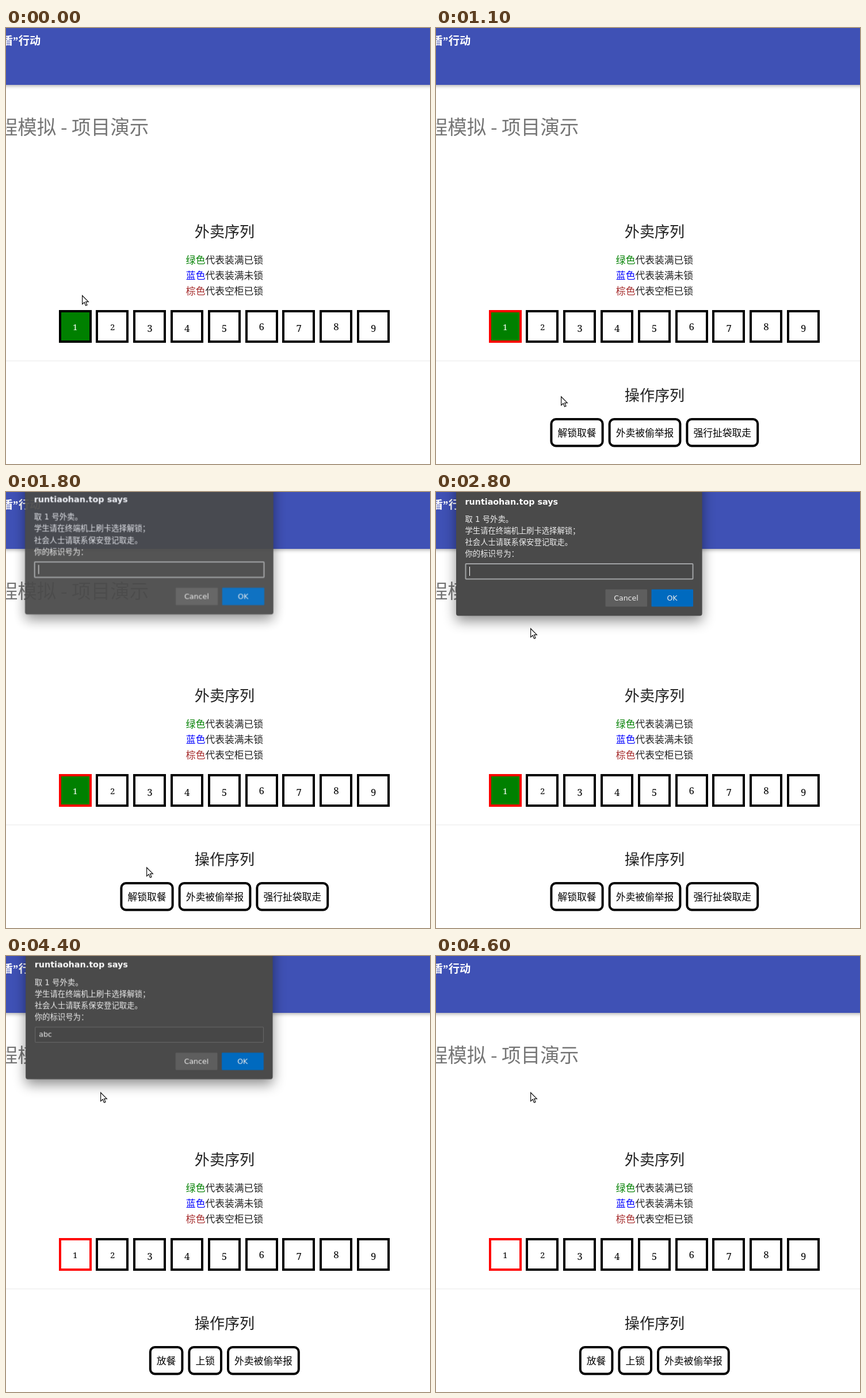
These frames come from a looping animation (737x759 px, 5.6 s). An HTML page:

```html
<!DOCTYPE html>
<html lang="zh-CN">
<head>
<meta charset="utf-8">
<title>外卖柜流程演示</title>
<style>
  html, body { margin: 0; width: 100%; height: 100%; overflow: hidden; background: #fff; }
  svg { display: block; width: 737px; height: 759px; }
  text { font-family: "Noto Sans CJK SC", "Noto Sans CJK", sans-serif; font-size: 16.8px; fill: #212121; white-space: pre; }
  .mid { text-anchor: middle; }
  .end { text-anchor: end; }
  .bar { fill: #3f51b5; filter: drop-shadow(0 2px 3px rgba(0, 0, 0, .32)); }
  .brand { font-size: 19.2px; font-weight: 700; fill: #fff; }
  .quote { font-family: "Noto Serif", serif; }
  .title { font-size: 33.6px; fill: #757575; }
  .heading { font-size: 26.1px; }
  .frame { fill: #fff; stroke: #000; stroke-width: 4; }
  .digit { font-family: "Noto Serif", serif; font-variant-numeric: lining-nums; fill: #000; }
  .action { fill: #000; }
  #dialog { transform-origin: 249px 470px; }
  #dialog text { font-family: "DejaVu Sans", "Noto Sans CJK SC", sans-serif; font-size: 13.33px; fill: #eee; }
  #dialog .host { font-size: 14.3px; font-weight: 700; fill: #fff; }
  #dialog .ui { font-size: 12.5px; }
  .sheet { fill: #4a4a4a; filter: drop-shadow(0 9px 11px rgba(0, 0, 0, .45)); }
  #field { fill: #474747; stroke: #a0a2a4; stroke-width: 2; }
</style>
</head>
<body>
<svg viewBox="0 0 737 759">
  <rect class="bar" x="-20" y="-20" width="777" height="119"/>
  <text class="brand end" x="11.8" y="29.3">盾</text>
  <text class="brand quote" x="12" y="30">”</text>
  <text class="brand end" x="60.2" y="29.3">行动</text>
  <text class="title end" x="248.4" y="184.6">程模拟 - 项目演示</text>

  <text class="heading mid" x="380" y="363.8">外卖序列</text>
  <g id="legend"></g>
  <g id="boxes"></g>
  <rect y="579" width="737" height="1" fill="#e9e9e9"/>

  <g id="panel">
    <text class="heading mid" x="380" y="648.8">操作序列</text>
    <g id="fullActions"></g>
    <g id="emptyActions"></g>
  </g>

  <g id="dialog">
    <rect class="sheet" x="35" y="-60" width="427.6" height="275.5" rx="4"/>
    <text class="host" x="50.5" y="21.6">runtiaohan.top says</text>
    <text x="50.5" y="52">取 1 号外卖。</text>
    <text x="50.5" y="72">学生请在终端机上刷卡选择解锁；</text>
    <text x="50.5" y="92">社会人士请联系保安登记取走。</text>
    <text x="50.5" y="112">你的标识号为：</text>
    <rect id="field" x="51.5" y="125" width="395" height="26.6" rx="1"/>
    <text class="ui" x="58" y="142.3"><tspan id="keyA">a</tspan><tspan id="keyB">b</tspan><tspan id="keyC">c</tspan></text>
    <rect id="caret" x="58" y="130" width="1" height="16" fill="#fff"/>
    <rect x="294.5" y="169.5" width="72.5" height="30" rx="1" fill="#5e5e5e"/>
    <text class="ui mid" x="330.5" y="189">Cancel</text>
    <rect x="374.5" y="169.5" width="72.5" height="30" rx="1" fill="#006abf"/>
    <text class="ui mid" x="410.5" y="189">OK</text>
  </g>

  <path id="cursor" d="M.6.8V15.6L4.2 12.5 6.6 18.2 9 17.2 6.7 11.7H11.3Z" fill="#fff" stroke="#111" stroke-width="1.2"/>
</svg>
<script>
const LOOP = 5600, CENTER = 379.8, FONT = 16.8;
const $ = id => document.getElementById(id);

// Static parts
$('legend').innerHTML = [['green', '绿色', '代表装满已锁'], ['blue', '蓝色', '代表装满未锁'], ['brown', '棕色', '代表空柜已锁']]
  .map(([color, name, rest], i) =>
    `<text class="mid" x="380" y="${409.6 + 27 * i}"><tspan fill="${color}">${name}</tspan>${rest}</text>`).join('');

// Old-style figures: 1 and 2 are small, 3 4 5 7 9 hang below the baseline
$('boxes').innerHTML = Array.from({ length: 9 }, (_, i) => {
  const n = i + 1, left = 91.6 + 64.8 * i;
  const drop = [3, 4, 5, 7, 9].includes(n) ? 3 : 0;
  const size = n < 3 ? 15 : FONT;
  return `<rect class="frame" x="${Math.round(left) + 2}" y="493" width="53" height="53"/>
    <text class="digit mid" x="${left + 28.7}" y="${525.8 + drop}" style="font-size:${size}px">${n}</text>`;
}).join('');

function drawActions(group, labels) {
  const gap = 8, widths = labels.map(s => s.length * FONT + 26);
  let x = CENTER - (widths.reduce((a, b) => a + b) + gap * (labels.length - 1)) / 2;
  group.innerHTML = labels.map((label, i) => {
    const w = widths[i], left = x;
    x += w + gap;
    return `<rect class="frame" x="${left + 2}" y="681" width="${w - 4}" height="46.5" rx="8"/>
      <text class="action mid" x="${left + w / 2}" y="711.4">${label}</text>`;
  }).join('');
}
drawActions($('fullActions'), ['解锁取餐', '外卖被偷举报', '强行扯袋取走']);
drawActions($('emptyActions'), ['放餐', '上锁', '外卖被偷举报']);

// Motion: each step is [time in ms, value], held until the next one
function play(el, prop, steps) {
  const frames = steps.map(([time, value]) => ({ offset: time / LOOP, [prop]: value, easing: 'step-end' }));
  frames.push({ offset: 1, [prop]: steps.at(-1)[1] });
  el.animate(frames, { duration: LOOP, iterations: Infinity });
}
const show = (el, from, to = LOOP) => play(el, 'opacity',
  [[0, 0], [from, 1], ...(to < LOOP ? [[to, 0]] : [])]);

const path = [
  [0, 132, 465], [200, 130, 472], [300, 130, 484], [400, 133, 496], [500, 136, 505], [600, 138, 511],
  [900, 152, 545], [1000, 185, 597], [1100, 217, 641], [1200, 232, 672], [1300, 238, 687],
  [1400, 241, 694], [1500, 244, 697], [1800, 244, 653], [1900, 240, 565], [2000, 226, 455],
  [2100, 205, 362], [2200, 183, 291], [2300, 170, 256], [2400, 164, 237]
];
play($('cursor'), 'transform', path.map(([t, x, y]) => [t, `translate(${x}px, ${y}px)`]));

const [firstBox, firstDigit] = $('boxes').children;
play(firstBox, 'fill', [[0, '#008000'], [4300, '#fff']]);
play(firstBox, 'stroke', [[0, '#000'], [800, '#f00']]);
play(firstDigit, 'fill', [[0, '#fff'], [4300, '#000']]);

show($('panel'), 800);
show($('fullActions'), 800, 4300);
show($('emptyActions'), 4300);

play($('dialog'), 'opacity', [[0, 0], [1700, .6], [1800, .945], [1900, 1], [4500, .6], [4600, 0]]);
play($('dialog'), 'transform', [[0, 1.02], [1800, 1.0095], [1900, 1.003], [2000, 1], [4300, 1.001], [4400, 1.0042], [4500, 1.012]]
  .map(([t, s]) => [t, `scale(${s})`]));

show($('keyA'), 3300);
show($('keyB'), 3500);
show($('keyC'), 3800);
for (const [id, time] of [['keyA', 3300], ['keyB', 3500], ['keyC', 3800]])
  play($(id), 'fillOpacity', [[0, 0], [time, 1]]);
play($('caret'), 'opacity', [[0, 1], [2200, 0], [2800, 1], [4300, 0]]);
play($('caret'), 'transform', [[0, 0], [3300, 8], [3500, 15], [3800, 22]].map(([t, x]) => [t, `translateX(${x}px)`]));
play($('field'), 'stroke', [[0, '#a0a2a4'], [4300, '#6c6c6c']]);
play($('field'), 'strokeWidth', [[0, '2px'], [4300, '1px']]);
</script>
</body>
</html>
```
